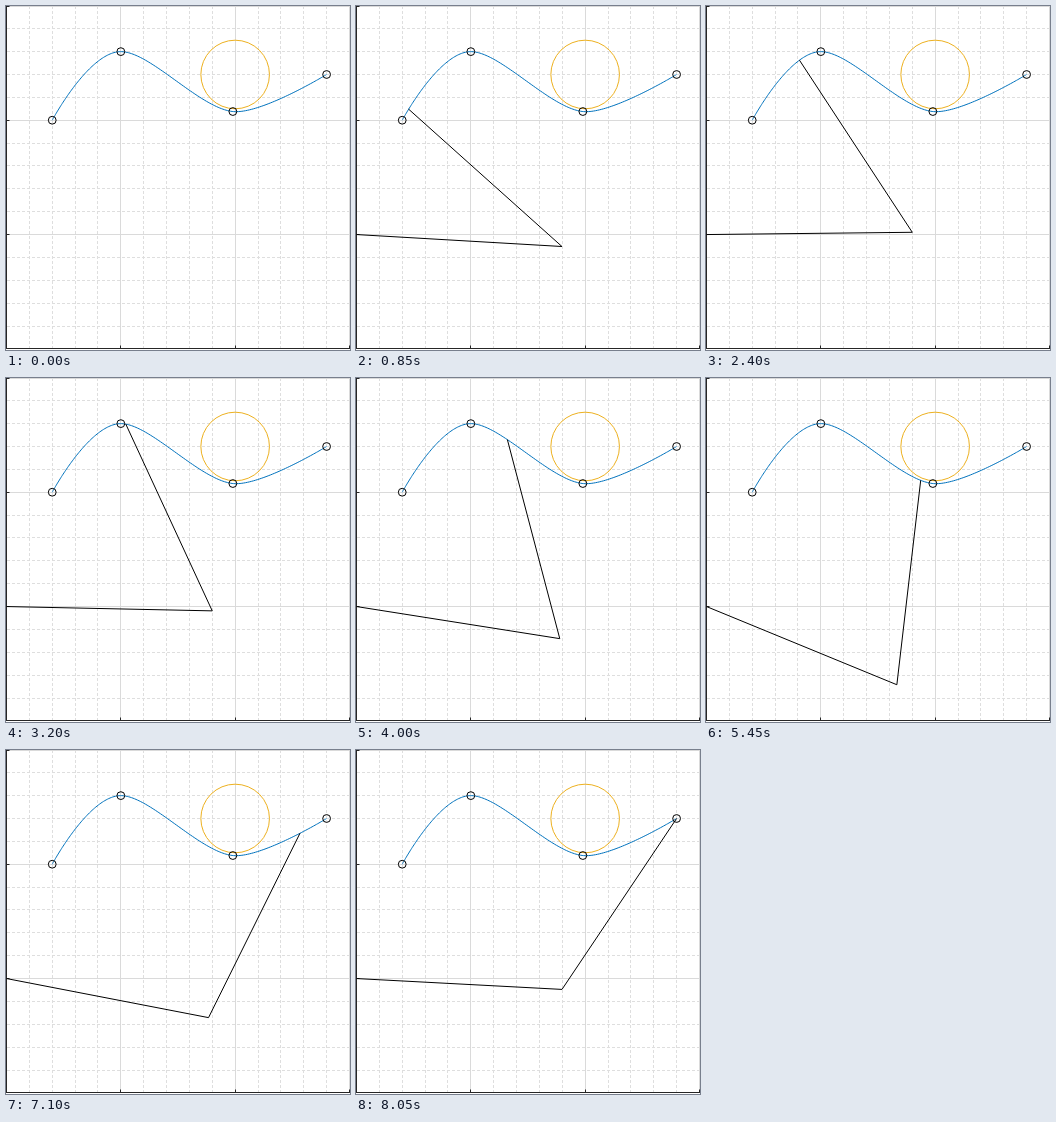
These frames come from a looping animation (344 px wide and 344 px high, 8100 ms). An HTML page with a canvas:

```html
<!DOCTYPE html>
<html>
<head>
<meta charset="utf-8">
<title>Two-link arm following a path</title>
<style>
html, body { margin: 0; width: 100%; height: 100%; overflow: hidden; background: #fff; }
canvas { display: block; }
</style>
</head>
<body>
<canvas id="stage" width="344" height="344"></canvas>
<script>
const ctx = document.getElementById('stage').getContext('2d');
const UNIT = 22.865, LINK = 9, LOOP = 8100, STEP = 50, STEPS = 160, SPAN = 8;

// Via points: time, position, velocity
const knots = [
  { t: 0, x: 2, y: 5, vx: 0, vy: 0 },
  { t: 2.97, x: 5, y: 8, vx: 1.407, vy: 0 },
  { t: 5.7, x: 9.9, y: 5.38, vx: 1.6, vy: -0.17 },
  { t: 8, x: 14, y: 7, vx: 0, vy: 0 }
];
const sx = x => 0.5 + x * UNIT;
const sy = y => 228.55 - y * UNIT;

function hermite(p, q, vp, vq, h, u) {
  const u2 = u * u, u3 = u2 * u;
  return p + (q - p) * (3 * u2 - 2 * u3)
    + vp * h * (u - 2 * u2 + u3) + vq * h * (u3 - u2);
}

function pathAt(t) {
  const i = t < knots[1].t ? 0 : t < knots[2].t ? 1 : 2;
  const a = knots[i], b = knots[i + 1], h = b.t - a.t, u = (t - a.t) / h;
  return [hermite(a.x, b.x, a.vx, b.vx, h, u), hermite(a.y, b.y, a.vy, b.vy, h, u)];
}

function elbow([x, y]) {
  const d = Math.hypot(x, y), k = Math.sqrt(LINK * LINK - d * d / 4) / d;
  return [x / 2 + y * k, y / 2 - x * k];
}

function polyline(points, color) {
  ctx.strokeStyle = color;
  ctx.beginPath();
  for (const [x, y] of points) ctx.lineTo(sx(x), sy(y));
  ctx.stroke();
}

function circle(x, y, r, color) {
  ctx.strokeStyle = color;
  ctx.beginPath();
  ctx.arc(sx(x), sy(y), r, 0, 2 * Math.PI);
  ctx.stroke();
}

function line(x1, y1, x2, y2, color) {
  ctx.strokeStyle = color;
  ctx.beginPath();
  ctx.moveTo(x1, y1);
  ctx.lineTo(x2, y2);
  ctx.stroke();
}

function drawGrid() {
  const snap = v => Math.max(0, Math.floor(v)) + 0.5;
  for (const major of [false, true]) {
    ctx.setLineDash(major ? [] : [3, 2]);
    const color = major ? '#dadada' : '#dedede';
    for (let i = 1; i <= 15; i++) {
      if ((i % 5 === 0) !== major) continue;
      const x = snap(sx(i)), y = snap(sy(i - 5));
      line(x, 0, x, 342, color);
      line(1, y, 343, y, color);
    }
  }
  const dark = '#262626';
  line(0.5, 0, 0.5, 343, dark);
  line(0, 342.5, 344, 342.5, dark);
  for (let i = 5; i <= 15; i += 5) {
    const x = snap(sx(i)), y = snap(sy(i - 5));
    line(x, 339.5, x, 342, dark);
    line(0, y, 3.5, y, dark);
  }
}

const curve = Array.from({ length: 201 }, (_, i) => pathAt(i * SPAN / 200));

function draw(now) {
  const n = Math.floor(now % LOOP / STEP) - 2;
  ctx.fillStyle = '#fff';
  ctx.fillRect(0, 0, 344, 344);
  drawGrid();
  polyline(curve, '#0072bd');
  circle(10, 7, 1.5 * UNIT, '#edb120');
  for (const k of knots) circle(k.x, k.y, 3.9, '#000');
  if (n >= 0) {
    const tip = pathAt(n * SPAN / (STEPS - 1));
    polyline([[0, 0], elbow(tip), tip], '#000');
  }
}

const start = performance.now();
function tick() {
  draw(performance.now() - start);
  requestAnimationFrame(tick);
}
tick();
</script>
</body>
</html>
```
